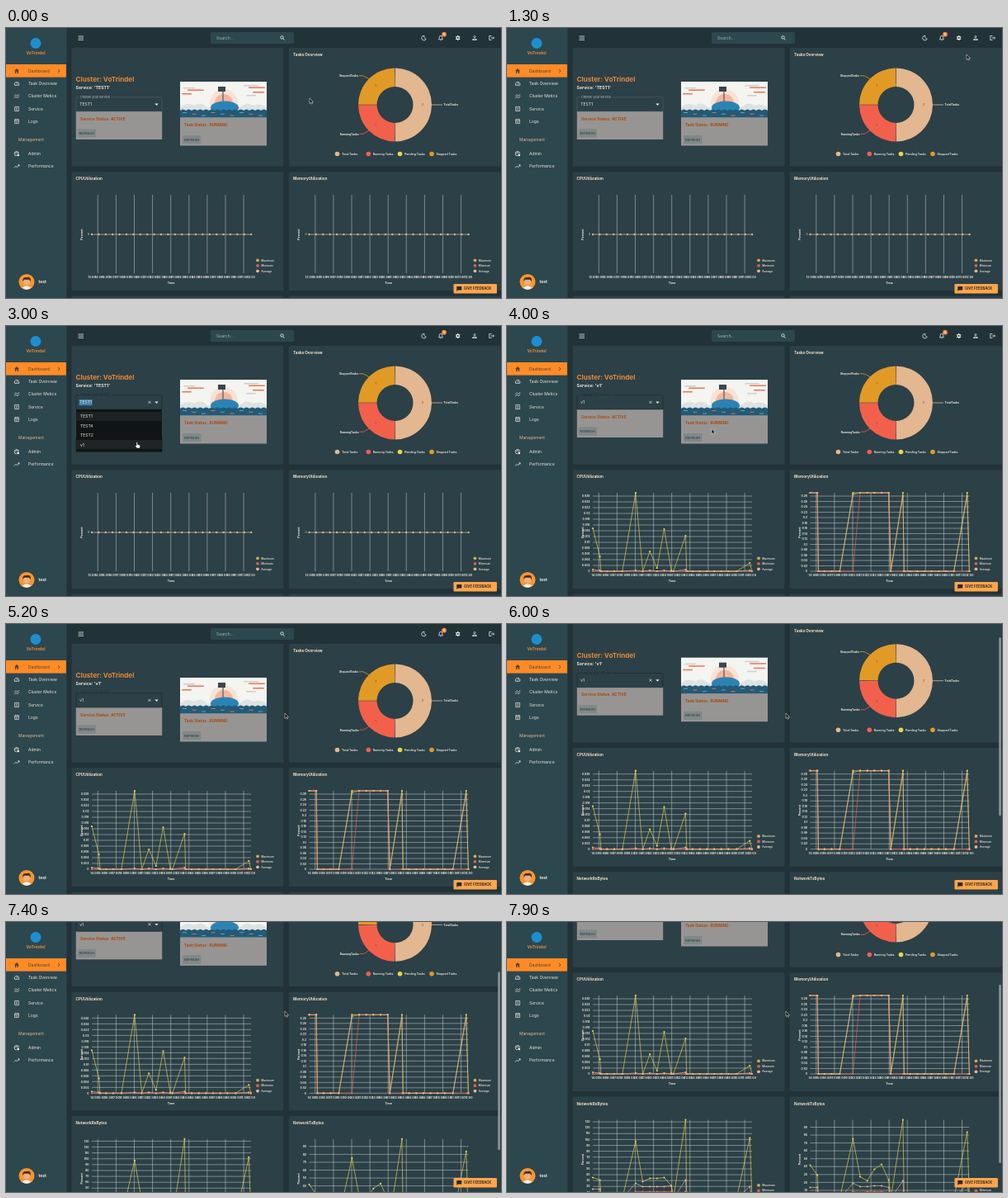
An HTML page that plays this animation: 600 by 327 pixels, repeating every 8 s.

```html
<!DOCTYPE html>
<html lang="en">
<head>
<meta charset="utf-8">
<title>Cluster dashboard</title>
<style>
html, body { margin: 0; height: 100%; overflow: hidden; background: #213238; }
svg { display: block; width: 600px; height: 327px; font-family: Inter, Roboto, sans-serif; }
</style>
</head>
<body>
<svg id="stage" viewBox="0 0 600 327"></svg>
<script>
const CREAM = '#efe9df', TITLE = '#f3dfc6', ORANGE = '#e5883a', DARK = '#213238', PANEL = '#2c4047', SIDE = '#2d474e';
const YELLOW = '#e8d44d', RED = '#f2604c', PEACH = '#e3b78f', GOLD = '#e29a26', GREY = '#979594';
const STATUS = '#a94a0c', ACTIVE = '#4b4136', GRID = '#ccd3d3';
const NAME = 'VoTrindel';

const text = (x, y, s, size = 5, fill = CREAM, extra = '') =>
  `<text x="${x}" y="${y}" font-size="${size}" fill="${fill}" ${extra}>${s}</text>`;
const bold = (x, y, s, size, fill, extra = '') => text(x, y, s, size, fill, 'font-weight="700" ' + extra);
const rect = (x, y, w, h, fill, extra = '') =>
  `<rect x="${x}" y="${y}" width="${w}" height="${h}" fill="${fill}" ${extra}/>`;
const dot = (x, y, r, fill) => `<circle cx="${x}" cy="${y}" r="${r}" fill="${fill}"/>`;
const line = (d, stroke = CREAM, w = .8, extra = '') =>
  `<path d="${d}" fill="none" stroke="${stroke}" stroke-width="${w}" ${extra}/>`;
const shape = (d, fill = CREAM) => `<path d="${d}" fill="${fill}"/>`;
const at = (x, y, s) => `<g transform="translate(${x} ${y})">${s}</g>`;
const group = (id, s) => `<g id="${id}">${s}</g>`;
const range = (n, f) => Array.from({ length: n }, (_, i) => f(i));
const MIDDLE = 'text-anchor="middle"';

// Icons, each drawn around its own centre
const icons = {
  home: shape('M-3 0L0-3L3 0H2V3H.7V.8H-.7V3H-2V0Z', ACTIVE),
  tasks: line('M-2.6 1.8A2.8 2.8 0 1 1 2.6 1.8ZM0 .6L1.3-1.2'),
  metrics: line('M-3 .2L-1-1.8L.8 0L3-2.4M-3 2.6L-1 .6L.8 2.4L3 0', CREAM, .7),
  service: line('M-2.4-2.6H2.4V2.6H-2.4ZM-1.2-.9H1.2M-1.2.9H1.2', CREAM, .7),
  logs: line('M-2.4-2.2H2.4V2.6H-2.4ZM-2.4-.8H2.4M-1.3-3V-2M1.3-3V-2M-1.2 1H1.2', CREAM, .7),
  admin: line('M-.2 2.6A2.7 2.7 0 1 1 2.5-.4M-1 0A1 1 0 1 1 .8-.6') + dot(1.7, 1.6, 1.4, CREAM),
  trend: line('M-3 1.8L-1-.2L.4 1.2L3-1.6M1.3-1.7H3V0'),
  moon: line('M.6-2.6A2.8 2.8 0 1 0 2.7 1A2.4 2.4 0 0 1 .6-2.6Z'),
  bell: line('M-2.6 1.8H2.6L1.8.8V-.8A1.8 1.8 0 0 0-1.8-.8V.8ZM-.6 2.8H.6'),
  gear: dot(0, 0, 2.1, CREAM) + line('M0-3V3M-2.6-1.5L2.6 1.5M-2.6 1.5L2.6-1.5', CREAM, 1.4) + dot(0, 0, 1, DARK),
  person: line('M-2.5 2.5V1.8Q0 0 2.5 1.8V2.5Z') + line('M-1.1-1.4A1.1 1.1 0 1 1 1.1-1.4A1.1 1.1 0 1 1-1.1-1.4', CREAM, .7),
  exit: line('M0-2.5H-2.7V2.5H0M-1 0H3M1.6-1.5L3.1 0L1.6 1.5'),
  lens: line('M-2.2-.6A1.7 1.7 0 1 1 1.2-.6A1.7 1.7 0 1 1-2.2-.6M.7.7L2.6 2.6', CREAM, .9)
};

function sidebar() {
  const items = [['home', 'Dashboard', 52], ['tasks', 'Task Overview', 67.5], ['metrics', 'Cluster Metics', 82.5],
    ['service', 'Service', 98], ['logs', 'Logs', 113], ['admin', 'Admin', 152.3], ['trend', 'Performance', 167.5]];
  return rect(0, 0, 73.5, 327, SIDE) +
    dot(36, 18.5, 6.5, '#1d8fd0') + bold(36, 31.5, NAME, 5, ORANGE, MIDDLE) +
    rect(0, 44, 73, 15.6, '#ff8b26') + line('M63 50L65 52L63 54', ACTIVE) +
    items.map(([icon, label, y]) => at(13, y, icons[icon]) +
      text(27, y + 1.8, label, 5, icon === 'home' ? ACTIVE : CREAM)).join('') +
    text(15, 137.3, 'Management', 5, PEACH) +
    dot(25, 307.5, 9.5, '#f7962e') + shape('M19.5 314.8Q25 309.5 30.5 314.8A9.5 9.5 0 0 1 19.5 314.8Z', '#e9eef0') +
    dot(25, 307.5, 4, '#e8b183') + shape('M20.4 307Q19.4 301.5 25 302Q30.8 301 29.8 307L28 304.8H22Z', '#4a2c20') +
    bold(39.5, 309.2, 'test', 5);
}

function header() {
  return line('M87.5 10H94M87.5 12.2H94M87.5 14.4H94') +
    rect(248, 5, 101, 14, SIDE, 'rx="2"') + text(255, 14, 'Search...', 5, '#aab6b7') +
    at(335, 12, icons.lens) + at(506.5, 12, icons.moon) + at(527, 12, icons.bell) +
    dot(531, 7.8, 3, '#f2803a') + bold(531, 9, '6', 3.4, '#fff', MIDDLE) +
    at(547.7, 12, icons.gear) + at(568, 12, icons.person) + at(588.5, 12, icons.exit);
}

const refresh = (x, y) => rect(x, y, 22.5, 10.3, '#818887', 'rx="1"') +
  text(x + 11.2, y + 6.7, 'REFRESH', 4.1, '#2b464d', 'font-weight="500" ' + MIDDLE);

function picture() {
  const clouds = [[215, 72, 14], [220, 74.5, 20], [213, 79, 12], [288, 69, 18], [294, 71.5, 20], [299, 77, 14], [291, 81, 12]];
  return rect(211, 65, 105, 43.5, '#f4f4f1') + dot(264, 91, 17, '#f7e3d5') + dot(264, 91, 11, '#f3b79e') +
    clouds.map(([x, y, w], i) => rect(x, y, w, 1.5, i % 3 ? '#ee7354' : '#c9d0d1', 'rx=".7"')).join('') +
    shape('M211 96Q220 89 228 94Q236 88 244 96H284Q292 88 300 94Q308 90 316 96V101H211Z', '#dde2e2') +
    line('M263 92V74', '#4d5a60', 1.2) + rect(257, 71, 9, 6, '#3a474d') +
    `<ellipse cx="265" cy="96.5" rx="17" ry="8" fill="#2b83b5"/>` +
    shape('M211 100' + range(15, () => 'q3.5-3 7 0').join('') + 'V108.5H211Z', '#235a76') +
    range(9, i => rect(214 + i * 11.5, 102 + i % 3 * 1.8, 5, .9, i % 2 ? '#ee7354' : '#74a6ba')).join('');
}

function clusterPanel() {
  return bold(84.5, 65.4, 'Cluster: ' + NAME, 8.1, ORANGE) +
    bold(84.5, 74.2, '<tspan id="service"></tspan>', 5.2, CREAM) +
    rect(84.8, 101, 104.4, 34, GREY) + bold(90, 111.7, 'Service Status: ACTIVE', 4.8, STATUS) + refresh(86.5, 122.3) +
    `<rect id="field" x="85" y="83.8" width="104" height="17.2" rx="1.3" fill="none" stroke-width=".6"/>` +
    rect(88.5, 82, 39, 3, PANEL) + text(90, 85, 'Choose your service', 3.7, '#b9c4c4', 'id="label"') +
    rect(88.5, 89, 16, 7.2, '#3f7fae', 'id="selection"') + text(89.3, 94.4, '', 5, CREAM, 'id="value"') +
    shape('M180.3 91.6H184.7L182.5 94Z') + group('clear', line('M172.4 90.8L175.6 94M175.6 90.8L172.4 94', CREAM, .7)) +
    picture() + rect(211, 108.5, 105, 34, GREY) + bold(216, 119.3, 'Task Status : RUNNING', 4.7, STATUS) + refresh(214, 130) +
    group('menu', rect(84.8, 101, 104.4, 51.5, '#101414') + rect(84.8, 104, 104.4, 11, '#1c2223') +
      `<rect id="hover" x="84.8" width="104.4" y="138" height="11" fill="#1e2526"/>` +
      ['TEST1', 'TEST4', 'TEST2', 'v1'].map((s, i) => text(90, 111.3 + i * 11.4, s)).join(''));
}

function tasksPanel() {
  const slice = (from, to, fill) => {
    const p = (a, r) => `${471.5 + r * Math.sin(a)} ${93 - r * Math.cos(a)}`;
    return shape(`M${p(from, 44.5)}A44.5 44.5 0 0 1 ${p(to, 44.5)}L${p(to, 22)}A22 22 0 0 0 ${p(from, 22)}Z`, fill);
  };
  const q = Math.PI / 2, gap = .008;
  const legend = [[401.5, PEACH, 'Total'], [439.3, RED, 'Running'], [477.5, YELLOW, 'Pending'], [516, GOLD, 'Stopped']];
  return slice(gap, 2 * q - gap, PEACH) + slice(2 * q + gap, 3 * q - gap, RED) + slice(3 * q + gap, 4 * q - gap, GOLD) +
    [[505, 93, 2], [448, 70, 1], [448, 118, 1]].map(([x, y, n]) => text(x, y + 1.2, n, 3.4, '#5a4030', MIDDLE)).join('') +
    line('M428 57.8H433L440 61.6', GOLD, .8) + line('M428.5 128.2H433.5L440 124.2', RED, .8) + line('M516 93H529', PEACH, .8) +
    bold(427, 59, 'StoppedTasks', 3.3, CREAM, 'text-anchor="end"') +
    bold(427.5, 129.5, 'RunningTasks', 3.3, CREAM, 'text-anchor="end"') + bold(530.5, 94.2, 'TotalTasks', 3.3) +
    legend.map(([x, c, s]) => dot(x, 152.5, 2.8, c) + text(x + 5.5, 153.8, s + ' Tasks', 3.5, CREAM, 'font-weight="600"')).join('');
}

// Charts: plot area is 193 by 95, origin at its top left
const SLOT = 8.65;
const slots = [0, 1, 1.15, 2, 3, 4.15, 6, 7, 8, 9, 10, 11, 11.3, 13, 13.15, 14, 15, 16, 17, 18, 19, 20.15, 22, 22.3];
const busy = [0, 1, 6, 7, 8, 9, 10, 11, 13, 22];
const hour = h => String(h % 24).padStart(2, '0') + ':00';
const uprights = line(range(9, i => `M${7.3 + i * 22.1} 0V95`).join(''), GRID, .5);

function series(heights, color) {
  const pts = slots.map(s => [+(s * SLOT).toFixed(2), 95 - (heights[busy.indexOf(s)] || 0)]);
  return line('M' + pts.join('L'), color, .65) + pts.map(([x, y]) => dot(x, y, 1.1, color)).join('');
}

function idlePlot() {
  const xs = range(24, i => i * 8.4);
  return uprights + line('M0 48H193', PEACH, .7) + xs.map(x => dot(x, 48, 1.15, PEACH)).join('') +
    text(-4, 49.2, 0, 3.4, CREAM, MIDDLE) + xs.map((x, i) => bold(x, 101.2, hour(13 + i), 3.4, CREAM, MIDDLE)).join('');
}

function loadedPlot({ ticks, unit, top, data }) {
  const y = i => 95 - i * (95 - top) / ticks;
  return uprights + line(range(ticks + 1, i => `M0 ${y(i)}H193`).join(''), GRID, .5) +
    range(ticks + 1, i => bold(-3.5, y(i) + 1.2, +(i * unit).toFixed(3), 3.3, CREAM, 'text-anchor="end"')).join('') +
    range(23, i => bold(3 + i * SLOT, 101.2, hour(14 + i), 3.4, CREAM, MIDDLE)).join('') +
    data.map((d, i) => series(d, [YELLOW, RED, PEACH][i])).join('');
}

const flat = n => busy.map(() => n);
const charts = [
  { x: 104, y: 202, ticks: 13, unit: .002, top: 4,
    data: [[52, 18, 95, 0, 24, 4, 51, 1, 43, 10], flat(0), [2, 1, 1, 0, 1, 0, 1, 0, 2, 1]] },
  { x: 367.5, y: 202, ticks: 14, unit: .02, top: 4,
    data: [flat(95), [95, 95, 0, 95, 95, 95, 95, 95, 0, 0], [95, 95, 93, 95, 95, 95, 95, 95, 91, 91]] },
  { x: 104, y: 352.5, ticks: 13, unit: 10, top: 2.6,
    data: [[25, 22, 69, 20, 24, 24, 25, 15, 95, 73], [4, 4, 8, 8, 8, 8, 8, 8, 8, 6], [11, 11, 18, 14, 14, 14, 14, 15, 22, 14]] },
  { x: 367.5, y: 352.5, ticks: 9, unit: 10, top: 9,
    data: [[40, 28, 72, 26, 21, 35, 41, 22, 95, 80], [4, 4, 8, 7, 8, 8, 8, 7, 7, 6], [13, 13, 18, 14, 14, 15, 15, 13, 21, 17]] }
];

function chart(c) {
  const legend = [['Maximum', '#c9b24a'], ['Minimum', '#d9614e'], ['Average', PEACH]];
  return at(c.x, c.y,
    `<g class="idle">${idlePlot()}</g><g class="loaded">${loadedPlot(c)}</g>` +
    bold(0, 0, 'Percent', 3.5, CREAM, MIDDLE + ' transform="translate(-11.5 48) rotate(-90)"') +
    bold(96, 108.2, 'Time', 3.5, CREAM, MIDDLE) +
    legend.map(([s, fill], i) => dot(201, 79.3 + i * 6.5, 1.9, fill) + text(205.3, 80.5 + i * 6.5, s, 3.3, CREAM, 'font-weight="500"')).join(''));
}

function page() {
  const titles = ['', 'Tasks Overview', 'CPUUtilization', 'MemoryUtilization', 'NetworkRxBytes', 'NetworkTxBytes'];
  return header() + titles.map((s, i) => {
    const col = i % 2, y = 24 + (i >> 1) * 150.3;
    return rect(79.5 + col * 263.3, y, 257, 143.7, PANEL, 'rx="1.5"') + bold(84.5 + col * 263.5, y + 10, s, 4.6, TITLE);
  }).join('') + clusterPanel() + tasksPanel() + charts.map(chart).join('');
}

const stage = document.getElementById('stage');
stage.innerHTML = rect(0, 0, 600, 327, DARK) + group('page', page()) + sidebar() +
  rect(596.3, 0, 2.6, 216, '#8b9799', 'id="thumb" rx="1.3"') +
  rect(542.5, 310, 52.5, 11.6, '#ffa54c', 'rx="1.3"') +
  shape('M546.3 313H552.3V317.6H547.7L546.3 319Z', '#2a2a2a') + bold(555, 317.4, 'GIVE FEEDBACK', 4.2, '#2a2a2a') +
  group('cursor', group('arrow', `<path d="M0 0V6.4L1.5 5.1L2.5 7.2L3.5 6.7L2.6 4.7H4.5Z" fill="#111" stroke="#fff" stroke-width=".5"/>`) +
    group('hand', `<path d="M0 0Q1-1 1.5 0V2.5L4.3 3.2Q5 3.6 4.6 5L4 7H.6L-1.6 4.2Q-1.2 3.2 0 4Z" fill="#fff" stroke="#111" stroke-width=".5"/>`));

const $ = id => document.getElementById(id);
const show = (el, on) => { el.style.display = on ? '' : 'none'; };
const place = (el, x, y) => el.setAttribute('transform', `translate(${x} ${y})`);

const OPEN = 2400, PICK = 3400, LOADED = 3900, SCROLL = 5480, LOOP = 8000;
const route = [[0, 368, 85], [1000, 557, 32], [1500, 557, 32], [2200, 181, 92], [2500, 181, 92],
  [2900, 158, 141], [3500, 158, 141], [4500, 338, 108], [LOOP, 338, 108]];

function pointer(t) {
  const i = route.findIndex(k => k[0] > t), [t0, x0, y0] = route[i - 1], [t1, x1, y1] = route[i];
  const u = (t - t0) / (t1 - t0), e = u * u * (3 - 2 * u);
  return [x0 + (x1 - x0) * e, y0 + (y1 - y0) * e];
}

function draw(t) {
  const open = t >= OPEN && t < PICK, focused = t >= OPEN, picked = t >= PICK;
  const scroll = Math.max(0, t - SCROLL) * .0467;
  const [x, y] = pointer(t);
  place($('page'), 0, -scroll);
  place($('thumb'), 0, scroll * .673);
  show($('thumb'), scroll > 0);
  place($('cursor'), x, y);
  const hand = t >= 2100 && t < 3700;
  show($('hand'), hand);
  show($('arrow'), !hand);
  show($('menu'), open);
  show($('selection'), open);
  show($('clear'), focused);
  show($('hover'), y > 137);
  $('value').textContent = picked ? 'v1' : 'TEST1';
  $('service').textContent = `Service: '${picked ? 'v1' : 'TEST1'}'`;
  $('field').setAttribute('stroke', focused ? '#18262b' : '#4f6267');
  $('label').setAttribute('fill', focused ? '#1b2a30' : '#b9c4c4');
  for (const el of document.querySelectorAll('.idle')) show(el, t < LOADED);
  for (const el of document.querySelectorAll('.loaded')) show(el, t >= LOADED);
}

const start = performance.now();
function tick() {
  const t = (performance.now() - start) % LOOP;
  draw(Math.floor(t / 100) * 100);
  requestAnimationFrame(tick);
}
tick();
</script>
</body>
</html>
```
